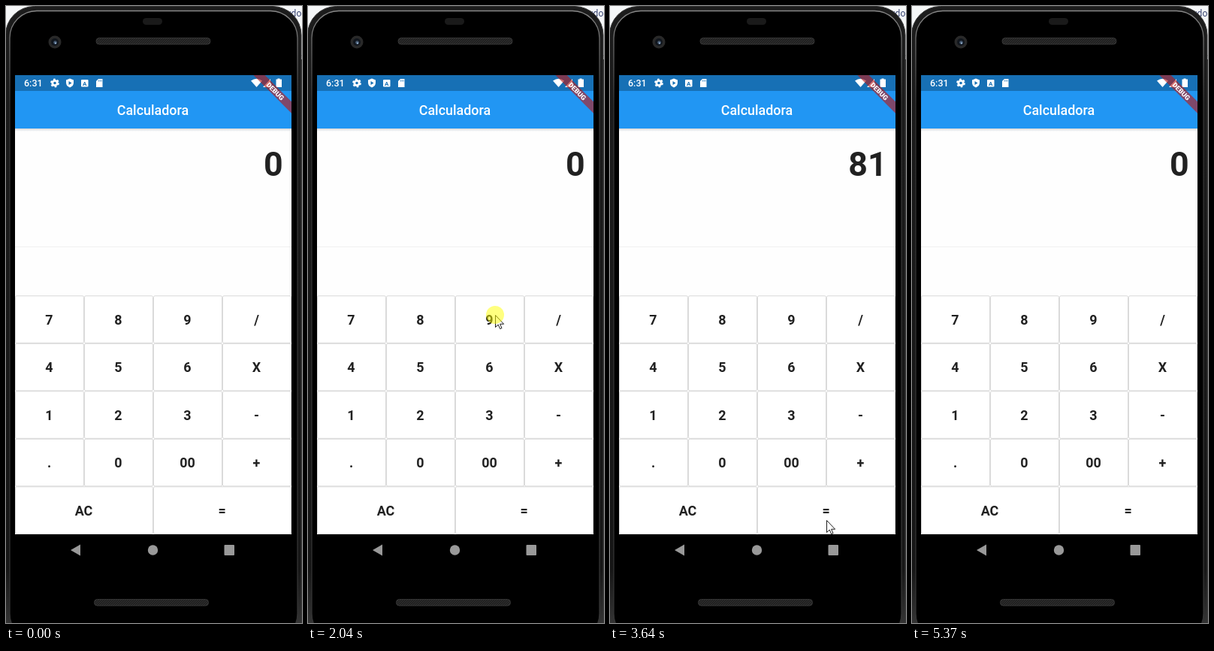
These frames come from a looping animation (394 by 821 pixels, 5.68 s). An HTML page:

```html
<!DOCTYPE html>
<html lang="pt">
<head>
<meta charset="utf-8">
<title>Calculadora</title>
<style>
  html, body { margin: 0; width: 100%; height: 100%; overflow: hidden; background: #000; }
  svg { display: block; width: 394px; height: 821px; font-family: Roboto, sans-serif; }
  .key rect { fill: #fff; stroke: #d6d6d6; stroke-width: .95; }
  .key.pressed rect { fill: #f0f0f0; stroke: #4d9fe0; }
  .key text { font-size: 17.9px; font-weight: 700; text-anchor: middle; fill: #212121; }
</style>
</head>
<body>
<svg viewBox="0 0 394 821">
  <defs>
    <linearGradient id="shade" x2="0" y2="1">
      <stop stop-color="#000" stop-opacity=".15"/>
      <stop offset="1" stop-color="#000" stop-opacity="0"/>
    </linearGradient>
    <linearGradient id="rim" x2="0" y2="1">
      <stop stop-color="#1c1c1c"/><stop offset=".85" stop-color="#161616"/>
      <stop offset=".93" stop-color="#333"/>
    </linearGradient>
    <linearGradient id="shine" gradientUnits="userSpaceOnUse" x1="0" y1="0" x2="0" y2="130">
      <stop stop-color="#8c8c8c"/><stop offset="1" stop-color="#333"/>
    </linearGradient>
    <pattern id="mesh" width="3" height="3" patternUnits="userSpaceOnUse">
      <rect width="3" height="3" fill="#2c2c2c"/>
      <path d="M0 3L3 0" stroke="#191919"/>
    </pattern>
    <clipPath id="screen"><rect x="12" y="92" width="368" height="611"/></clipPath>
    <clipPath id="keyClip"><rect id="keyClipRect"/></clipPath>
  </defs>

  <!-- backdrop and phone body -->
  <rect width="394" height="821" fill="#f5f7f8"/>
  <text x="373" y="14" font-size="12" fill="#34406e">udo</text>
  <path d="M388 66h6" stroke="#b5b5b5"/>
  <rect y="71" x="380" width="14" height="750" fill="#444"/>
  <rect x="-.5" y=".5" width="393.5" height="880" rx="38" fill="url(#rim)" stroke="#333"/>
  <rect x="5" y="6.500" width="383" height="838" rx="36" fill="#000" stroke="url(#shine)" stroke-width="1.300"/>
  <rect x="182" y="16" width="26" height="9" rx="4.5" fill="#1a1a1a"/>
  <g fill="url(#mesh)" stroke="#3d3d3d" stroke-width=".8">
    <rect x="120" y="42.500" width="152" height="8.500" rx="4"/>
    <rect x="117.500" y="789.500" width="152" height="8.500" rx="4"/>
  </g>
  <circle cx="65" cy="48" r="8.500" fill="#292929"/>
  <circle cx="65" cy="48" r="5" fill="#11161d"/>
  <circle cx="65.500" cy="48.500" r="2.300" fill="#465a72"/>
  <circle cx="66" cy="49.500" r="1" fill="#a9c6e6"/>
  <g fill="#999">
    <path d="M86 724L99 716.500V731.500Z"/>
    <circle cx="195.500" cy="724" r="6.700"/>
    <rect x="290.500" y="717" width="13.500" height="14" rx="1"/>
  </g>

  <!-- app -->
  <g clip-path="url(#screen)">
    <rect x="12" y="92" width="368" height="611" fill="#fefefe"/>
    <rect x="12" y="163" width="368" height="4" fill="url(#shade)"/>
    <rect x="12" y="113" width="368" height="50" fill="#2196f3"/>
    <rect x="12" y="92" width="368" height="21" fill="#1770b5"/>
    <text x="195.500" y="145" font-size="17.900" font-weight="500" text-anchor="middle" fill="#fff">Calculadora</text>
    <g fill="#fff">
      <text x="24" y="107" font-size="12.500" font-weight="500">6:31</text>
      <circle cx="65" cy="102.500" r="3.200" fill="none" stroke="#fff" stroke-width="2.800"/>
      <circle cx="65" cy="102.500" r="5" fill="none" stroke="#fff" stroke-width="1.800" stroke-dasharray="2.620"/>
      <path d="M85 96.500L90 98.500V102Q90 106.500 85 108.500Q80 106.500 80 102V98.500Z"/>
      <path d="M83.500 100V105L87.500 102.500Z" fill="#1770b5"/>
      <rect x="100" y="98" width="9.500" height="9.500" rx="1"/>
      <text x="104.750" y="105.700" font-size="8" font-weight="700" text-anchor="middle" fill="#1770b5">A</text>
      <path d="M123 97H128.500V108H120V100Z"/>
      <path d="M123.300 98.500v2M125.200 98.500v2M127 98.500v2" stroke="#1770b5" stroke-width=".8"/>
      <path d="M326 99.500Q333.500 94 341 99.500L333.500 108Z"/>
      <path d="M352 97V108H342Z"/>
      <path d="M361.500 96.500H364.500V97.500H367V108H359.500V97.500H361.500Z"/>
    </g>
    <path d="M12 320.500H380" stroke="#f0f0f0"/>
    <text id="display" x="368.600" y="225.700" font-size="44.800" font-weight="700" text-anchor="end" fill="#212121">0</text>
    <g id="keys"></g>
    <g transform="translate(380 92) rotate(45)">
      <rect x="-36" y="25" width="72" height="10.800" fill="#b71c1c" fill-opacity=".63"/>
      <text y="33.700" font-size="9.100" font-weight="900" text-anchor="middle" fill="#fff">DEBUG</text>
    </g>
  </g>

  <path id="cursor" d="M.5 .5V16.500L4.200 13L6.700 18.600L9 17.600L6.600 12.200H11.600Z" fill="#fff" stroke="#111" stroke-width=".95"/>
  <circle id="tap" r="12" fill="#ff0" fill-opacity=".5"/>
</svg>
<script>
const LOOP = 5680, TICK = 78.6;
const $ = id => document.getElementById(id);
const make = (tag, attrs, parent) => {
  const el = document.createElementNS('http://www.w3.org/2000/svg', tag);
  for (const name in attrs) el.setAttribute(name, attrs[name]);
  return parent.appendChild(el);
};

// Keypad
const keys = {};
[['7', '8', '9', '/'], ['4', '5', '6', 'X'], ['1', '2', '3', '-'], ['.', '0', '00', '+'], ['AC', '=']]
  .forEach((row, r) => row.forEach((label, c) => {
    const w = 368 / row.length, h = 63.5, x = 12 + c * w, y = 385.3 + r * h;
    const group = make('g', { class: 'key' }, $('keys'));
    const box = { x: x + .45, y: y + .45, width: w - .9, height: h - .9, rx: 1.8 };
    make('rect', box, group);
    make('text', { x: x + w / 2 - .5, y: y + 38.5 }, group).textContent = label;
    keys[label] = { group, box };
  }));
const ripple = make('circle', { 'clip-path': 'url(#keyClip)' }, $('keys'));

// Cursor legs: start time, number of samples, end point
const legs = [
  { at: 220, n: 1, to: [320, 711] },
  { at: 300, n: 6, to: [242, 419], ease: p => 1 - (1 - p) ** 1.7 },
  { at: 950, n: 5, to: [333, 483] },
  { at: 1570, n: 6, to: [249, 411] },
  { at: 2280, n: 5, to: [303, 686] },
  { at: 3320, n: 1, to: [303, 685] },
  { at: 3640, n: 6, to: [104, 676] },
  { at: 4820, n: 7, to: [332, 812], ease: p => p ** 1.4 }
];
const smooth = p => p * p * (3 - 2 * p);
const path = [];
let from = legs[0].to;
for (const { at, n, to, ease = smooth } of legs) {
  for (let i = 1; i <= n; i++) {
    const p = ease(i / n);
    path.push({ t: at + (i - 1) * TICK, x: from[0] + (to[0] - from[0]) * p, y: from[1] + (to[1] - from[1]) * p });
  }
  from = to;
}

// Taps: pointer down and up, key highlighted, highlight off, ripple gone
const taps = [
  { key: '9', at: [242, 419], down: 780, up: 870, lit: 780, off: 950, gone: 1030 },
  { key: 'X', at: [333, 483], down: 1330, up: 1410, lit: 1410, off: 1570, gone: 1650 },
  { key: '9', at: [249, 411], down: 2040, up: 2120, lit: 2120, off: 2280, gone: 2360 },
  { key: '=', at: [303, 687], down: 2680, up: 2760, lit: 2760, off: 2920, gone: 3080 },
  { key: 'AC', at: [104, 676], down: 4110, up: 4190, lit: 4190, off: 4350, gone: 4350 }
];
const readouts = [[0, '0'], [870, '9'], [1490, '0'], [2200, '9'], [2840, '81'], [4270, '0']];

const within = (t, a, b) => t >= a && t < b;
const show = (el, on) => el.setAttribute('visibility', on ? 'visible' : 'hidden');
const set = (el, attrs) => { for (const name in attrs) el.setAttribute(name, attrs[name]); };

function render(t) {
  $('display').textContent = readouts.findLast(([at]) => t >= at)[1];

  const spot = path.findLast(p => t >= p.t - 1);
  show($('cursor'), spot && t < 5370);
  if (spot) set($('cursor'), { transform: `translate(${Math.round(spot.x)} ${Math.round(spot.y)})` });

  const touch = taps.find(p => within(t, p.down, p.up));
  show($('tap'), touch);
  if (touch) set($('tap'), { cx: touch.at[0], cy: touch.at[1] });

  const active = taps.find(p => within(t, p.lit, p.gone));
  for (const label in keys) {
    keys[label].group.classList.toggle('pressed', !!active && active.key === label && t < active.off);
  }
  show(ripple, active);
  if (active) {
    const released = t >= active.off;
    set($('keyClipRect'), keys[active.key].box);
    set(ripple, {
      cx: active.at[0], cy: active.at[1],
      r: released ? 68 : 9,
      fill: released ? 'rgba(0,0,0,.082)' : 'rgba(0,0,0,.05)'
    });
  }
}

const start = performance.now();
(function frame() {
  render((performance.now() - start) % LOOP);
  requestAnimationFrame(frame);
})();
</script>
</body>
</html>
```
